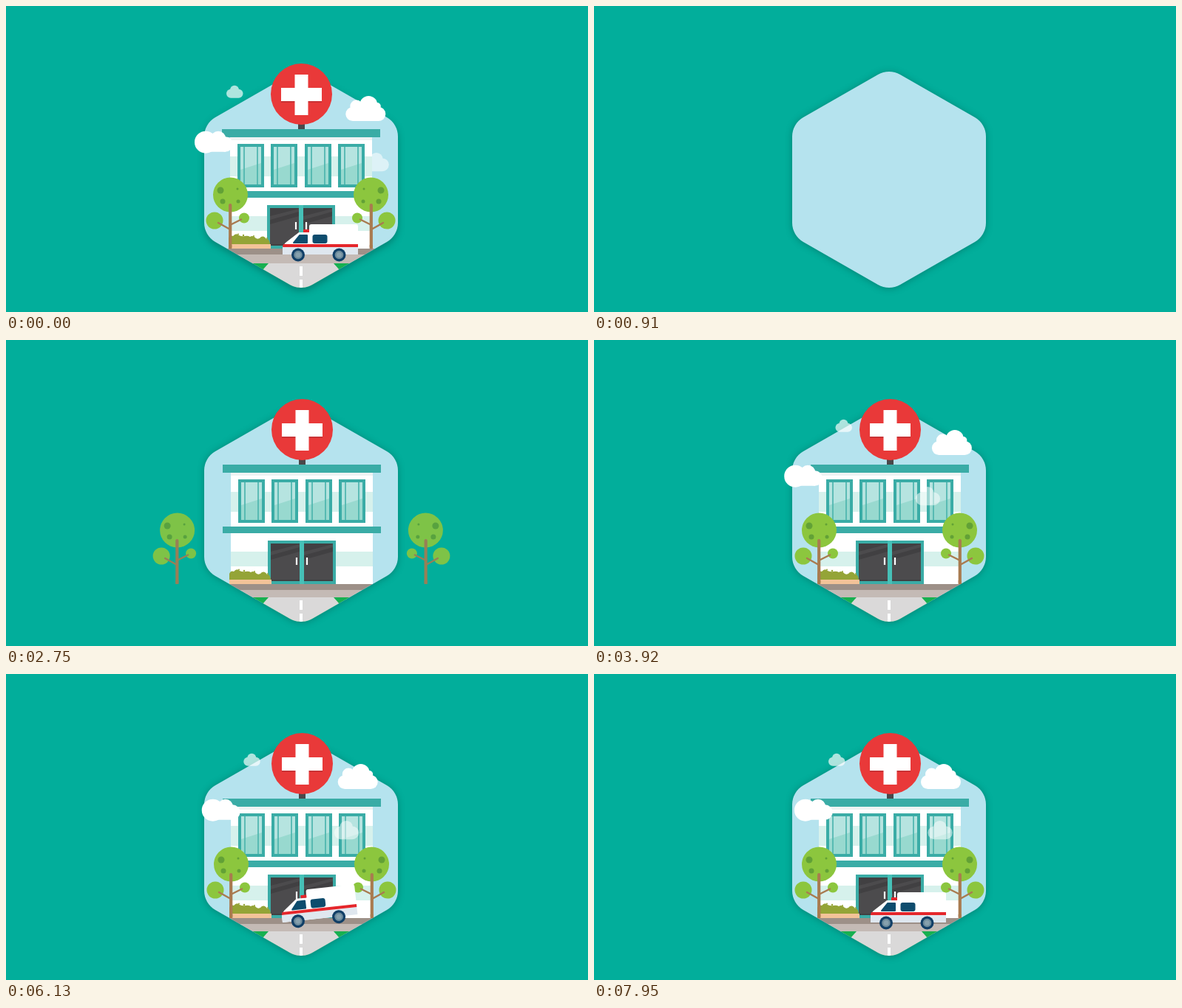
Animation, 787 px wide and 415 px high, one loop 8 s. Source, as an HTML page:

```html
<!DOCTYPE html>
<html lang="en">
<head>
<meta charset="utf-8">
<title>Hospital</title>
<style>
  html, body { margin: 0; width: 100%; height: 100%; overflow: hidden; background: #02ae9b; }
  svg { display: block; width: 100%; height: 100%; }
</style>
</head>
<body>
<svg viewBox="0 0 787 415">
  <defs>
    <path id="hexShape" d="M414 93L515 151A30 30 0 0 1 530 177V294A30 30 0 0 1 515 320L414 378A30 30 0 0 1 384 378L283 320A30 30 0 0 1 268 294V177A30 30 0 0 1 283 151L384 93A30 30 0 0 1 414 93Z"/>
    <clipPath id="hexClip"><use href="#hexShape"/></clipPath>
    <g id="window">
      <path fill="#3aaca6" d="M0 0H36V59H0Z"/>
      <path fill="#b6e4e0" d="M4 4H32V55H4Z"/>
      <path fill="#98d9cf" d="M4 35L32 26V55H4Z"/>
      <path stroke="#4db5ae" stroke-width="1.7" d="M9 4V55M27 4V55"/>
    </g>
    <g id="leaf">
      <path fill="#4c4b4d" d="M0 0H39V51H0Z"/>
      <path fill="#414042" d="M0 0H39V1L0 11ZM0 16L39 5V11L0 22ZM0 49H39V51H0Z"/>
    </g>
    <g id="tree">
      <circle cx="304.5" cy="258" r="23.5" fill="#8cc63e"/>
      <circle cx="283" cy="293" r="11.5" fill="#8cc63e"/>
      <circle cx="323" cy="289.5" r="7" fill="#8cc63e"/>
      <g fill="#62a136">
        <circle cx="291" cy="252" r="4.5"/><circle cx="314" cy="250" r="1.5"/>
        <circle cx="294" cy="267" r="3.5"/><circle cx="315" cy="267" r="2.5"/>
      </g>
      <g stroke="#a97b50" fill="none" stroke-linecap="round">
        <path stroke-width="2.5" d="M304 305L288 296M304 299L319 291.5"/>
        <path stroke-width="4.2" d="M304.2 272V329"/>
      </g>
      <path fill="#a97b50" d="M302.1 326H306.3V331H302.1Z"/>
    </g>
    <g id="puff">
      <rect y="5" width="22.5" height="12" rx="6"/>
      <circle cx="11" cy="6" r="6"/>
    </g>
    <g id="wheel">
      <circle r="9" fill="#113f67"/>
      <circle r="5.8" fill="#6d8b9c"/>
      <circle r="3.5" fill="#86a0ad"/>
    </g>
  </defs>

  <rect width="787" height="415" fill="#02ae9b"/>
  <g id="scene">
    <use id="hex" href="#hexShape" fill="#b5e3ee"/>
    <g id="backPuff" fill="#fff" opacity=".55"><use href="#puff" transform="translate(484.5 199) scale(1.48)"/></g>

    <g id="sign">
      <path fill="#4a484a" d="M396 160H405V169H396Z"/>
      <circle cx="400.5" cy="121.5" r="41.5" fill="#e93939"/>
      <path fill="#c93235" d="M373 130H428V133H373Z"/>
      <path fill="#fff" d="M391.5 95H409.5V113H428V131H409.5V150H391.5V131H373V113H391.5Z"/>
    </g>

    <g id="building">
      <path fill="#fff" d="M304 180H496V331H304Z"/>
      <path fill="#eef3f3" d="M304 180H496V184H304Z"/>
      <path fill="#d6f1ec" d="M304 206H496V233H304ZM304 287H496V307H304Z"/>
      <path fill="#3aaca6" d="M293 169H507V180H293ZM293 253H507V262H293Z"/>
      <use href="#window" x="314" y="189"/>
      <use href="#window" x="359" y="189"/>
      <use href="#window" x="405" y="189"/>
      <use href="#window" x="450" y="189"/>
      <path fill="#3aaca6" d="M354 272H446V331H354Z"/>
      <path fill="#46c0b7" d="M397 272H403V331H397Z"/>
      <use href="#leaf" x="358" y="276"/>
      <use href="#leaf" x="403" y="276"/>
      <path stroke="#fff" stroke-width="2.2" d="M393 295V305M407 295V305"/>
      <path fill="#94a437" d="M302 325V317Q304 312 308 314Q312 309 316 313Q320 315 324 314Q328 313 331 315Q335 312 339 317Q343 319 346 315Q350 313 353 318Q357 317 358 325Z"/>
      <g fill="#94a437"><circle cx="315" cy="311.5" r="1"/><circle cx="322" cy="313" r="1.2"/><circle cx="336" cy="314" r="1"/><circle cx="354" cy="317" r="1"/></g>
      <path fill="#f3c398" d="M302 325H359V331H302Z"/>
    </g>

    <g clip-path="url(#hexClip)">
      <g id="ground">
        <path fill="#9d9088" d="M268 331H530V339H268Z"/>
        <path fill="#c4bab5" d="M268 339H530V352H268Z"/>
      </g>
      <g id="road">
        <path fill="#17b050" d="M268 349H530V383H268Z"/>
        <path fill="#dad9d9" d="M355 349H443L474 384H324Z"/>
        <path fill="#fff" d="M397 353H401V366H397ZM397 371H401V383H397Z"/>
      </g>
    </g>

    <g id="treeL"><use href="#tree"/></g>
    <g id="treeR"><use href="#tree" transform="matrix(-1 0 0 1 799 0)"/></g>

    <g id="clouds" fill="#fff">
      <g id="cloudL">
        <circle cx="15" cy="184.7" r="15"/><circle cx="32" cy="180" r="10.3"/>
        <circle cx="41.5" cy="187.5" r="10.3"/><path d="M15 182H42V197.8H18Z"/>
      </g>
      <g id="cloudR">
        <rect y="137" width="54" height="19" rx="9.5"/>
        <circle cx="31" cy="134" r="12"/><circle cx="14.5" cy="136" r="8.5"/><circle cx="42.5" cy="136" r="5"/>
      </g>
      <g id="cloudS" opacity=".68"><use href="#puff" y="107.7"/></g>
      <g id="cloudF" opacity=".5"><use href="#puff" transform="translate(0 199) scale(1.48)"/></g>
    </g>

    <g id="van">
      <path fill="#fff" d="M374 337V331Q374 325 378 321L396 307H410V299Q410 296 413 296H473Q476 296 476 299V337Z"/>
      <path fill="#dfe7ef" d="M374 327H476V337H374Z"/>
      <path fill="#e5262b" d="M375 323H476V327H374ZM402 303H410V307H402Z"/>
      <path fill="#0e4c6d" stroke="#0e4c6d" stroke-width="2" stroke-linejoin="round" d="M389 321L397 311H407V321Z"/>
      <rect x="414.5" y="310" width="20" height="12" rx="3" fill="#0e4c6d"/>
      <use href="#wheel" x="395" y="337.5"/>
      <use href="#wheel" x="450.5" y="337.5"/>
    </g>
  </g>
</svg>
<script>
const LOOP = 8000, STEP = 130;
const el = {};
document.querySelectorAll('#scene, #scene g[id], #hex').forEach(n => el[n.id] = n);

const clamp = v => Math.max(0, Math.min(1, v));
// Remaining share of a quadratic ease-out: 1 at start, 0 at end.
const rest = (t, start, dur) => (1 - clamp((t - start) / dur)) ** 2;
const move = (id, x, y = 0) => el[id].setAttribute('transform', `translate(${x} ${y})`);
const show = (id, v) => el[id].setAttribute('opacity', v);

// Time and angle of the van rocking on its brakes.
const rock = [[5200, 1.8], [5650, 1.8], [6130, -6.2], [6520, 1.7], [6910, -0.8], [7300, 0.5], [7700, 0]];
function tilt(t) {
  if (t <= rock[0][0]) return rock[0][1];
  for (let i = 1; i < rock.length; i++) {
    const [t0, a] = rock[i - 1], [t1, b] = rock[i];
    if (t < t1) return a + (b - a) * (1 - Math.cos(Math.PI * (t - t0) / (t1 - t0))) / 2;
  }
  return 0;
}

// The picture advances in even steps, with one long rest before the trees.
function hold(t) {
  const floor = (v) => Math.floor(v / STEP) * STEP;
  return t < 2490 ? Math.min(1560, floor(t)) : 2490 + floor(t - 2490);
}

function draw(time) {
  const t = hold(time);
  const poster = t < 260;
  const dx = poster ? -1 : 0, dy = poster ? -2 : 0;

  show('scene', poster ? 1 - t / 260 : 1);
  el.hex.style.filter = `drop-shadow(0 ${poster ? 4 : 1}px 5px rgba(0,0,0,.25))`;
  move('hex', 0, poster ? 0 : -300 * rest(t, 600, 310));
  show('hex', poster || t >= 650 ? 1 : 0);

  const rise = poster ? 0 : rest(t, 1250, 310);
  const built = poster || t >= 1300 ? 1 : 0;
  ['sign', 'building', 'ground', 'road'].forEach(id => show(id, built));
  move('sign', dx, dy - 230 * rise);
  move('building', dx, dy + 240 * rise);
  move('ground', dx, dy + 240 * rise);
  move('road', 0, 240 * rise);

  const apart = poster ? 0 : 340 * rest(t, 2460, 540);
  move('treeL', dx - apart, dy);
  move('treeR', dx + apart, dy);
  const grown = poster ? 1 : clamp((t - 2390) / 400);
  show('treeL', grown);
  show('treeR', grown);

  const s = poster ? 0 : (t - 3270) / 1000;
  show('clouds', poster ? 1 : clamp((t - 2750) / 450));
  move('cloudL', 255 + 3.4 * s);
  move('cloudR', 459.3 - 3.7 * s);
  move('cloudS', poster ? 298 : 328 - 2.35 * s);
  move('cloudF', 432 + 4.15 * s);
  show('cloudF', poster ? 0 : 0.5);
  show('backPuff', poster ? 0.55 : 0);

  const drive = poster ? 0 : 420 * rest(t, 5180, 820);
  show('van', poster || t >= 5220 ? 1 : 0);
  el.van.setAttribute('transform', `translate(${drive} 0) rotate(${poster ? 0 : tilt(t)} 374 337)`);
}

const begin = performance.now();
function tick() {
  draw((performance.now() - begin) % LOOP);
  requestAnimationFrame(tick);
}
tick();
</script>
</body>
</html>
```
